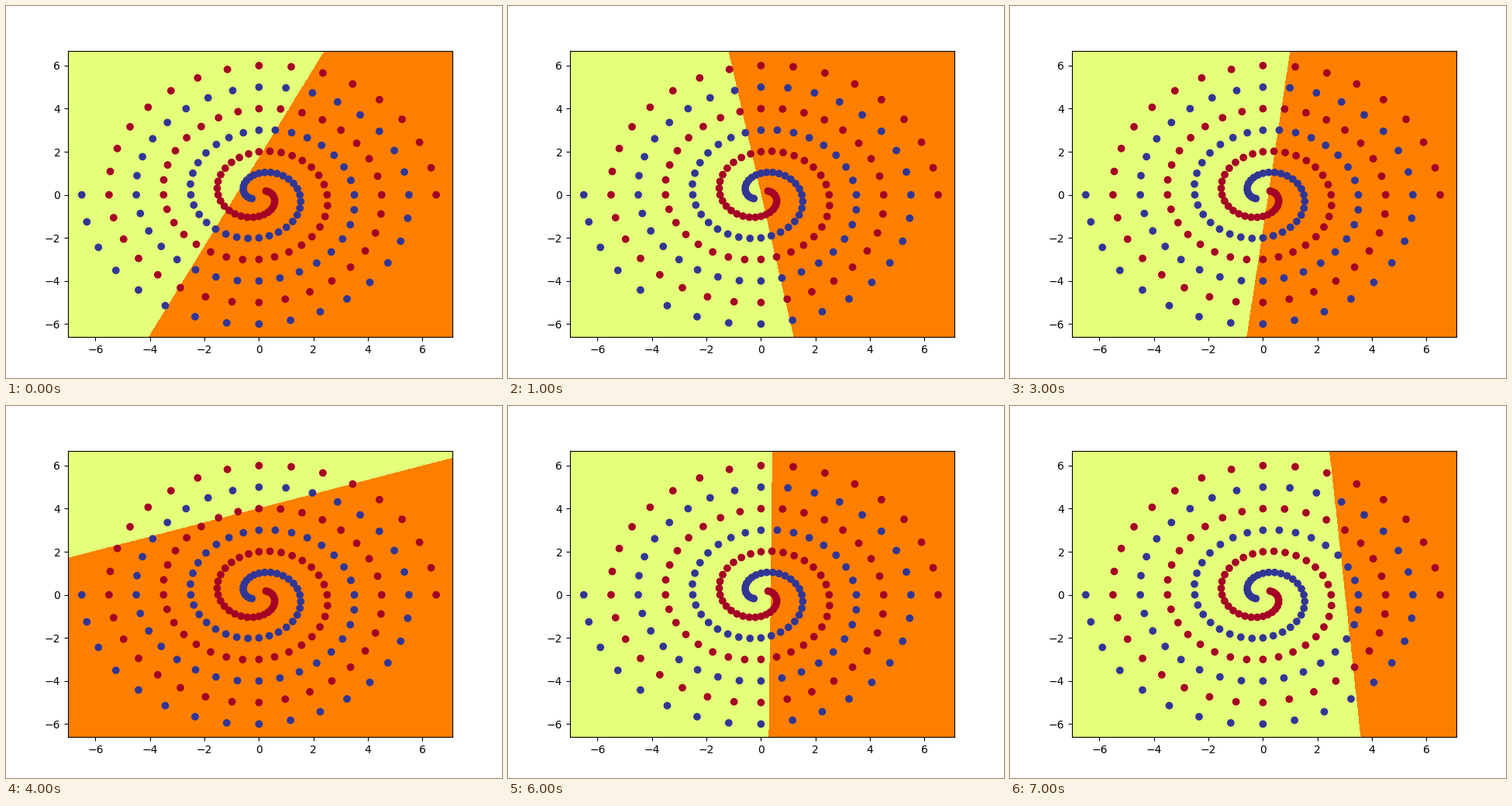
These frames come from a looping animation (640 by 480 pixels, 8 s). A matplotlib script:

```python
import numpy as np
import matplotlib.pyplot as plt
from matplotlib.animation import FuncAnimation

STEP = 0.01
X_LIM = (-7.005, 7.095)
Y_LIM = (-6.605, 6.695)
LEFT, RIGHT = X_LIM
BOTTOM, TOP = Y_LIM

# Decision line of each hidden unit, start to end; its left side is inactive.
LINES = [
    ((-4.05, BOTTOM), (2.415, TOP)),
    ((1.2, BOTTOM), (-1.2, TOP)),
    ((-1.87, BOTTOM), (5.74, TOP)),
    ((-0.6, BOTTOM), (1.0, TOP)),
    ((LEFT, 1.7), (RIGHT, 6.342)),
    ((-6.24, TOP), (6.556, BOTTOM)),
    ((0.287, BOTTOM), (0.414, TOP)),
    ((3.584, BOTTOM), (2.433, TOP)),
]

grid_x, grid_y = np.meshgrid(np.arange(-7, 7.095, STEP),
                             np.arange(-6.6, 6.695, STEP))


def unit_output(line):
    (x0, y0), (x1, y1) = line
    cross = (x1 - x0) * (grid_y - y0) - (y1 - y0) * (grid_x - x0)
    return (cross <= 0).astype(np.uint8)


def twin_spirals(count=100):
    i = np.arange(count)
    radius = 6.5 * (104 - i) / 104
    angle = i * np.pi / 16
    arm = np.column_stack([radius * np.cos(angle), radius * np.sin(angle)])
    return np.vstack([arm, -arm]), np.repeat([0, 1], count)


fig, ax = plt.subplots(figsize=(6.4, 4.8), dpi=100)
region = ax.imshow(unit_output(LINES[0]), extent=X_LIM + Y_LIM, origin="lower",
                   aspect="auto", interpolation="nearest",
                   cmap="Wistia", vmin=0, vmax=1)
points, labels = twin_spirals()
ax.scatter(points[:, 0], points[:, 1], c=labels, cmap="RdYlBu")
ax.set_xlim(X_LIM)
ax.set_ylim(Y_LIM)


def update(frame):
    region.set_data(unit_output(LINES[frame]))
    return [region]


anim = FuncAnimation(fig, update, frames=len(LINES), interval=1000,
                     repeat=True, repeat_delay=0)
plt.show()
```
